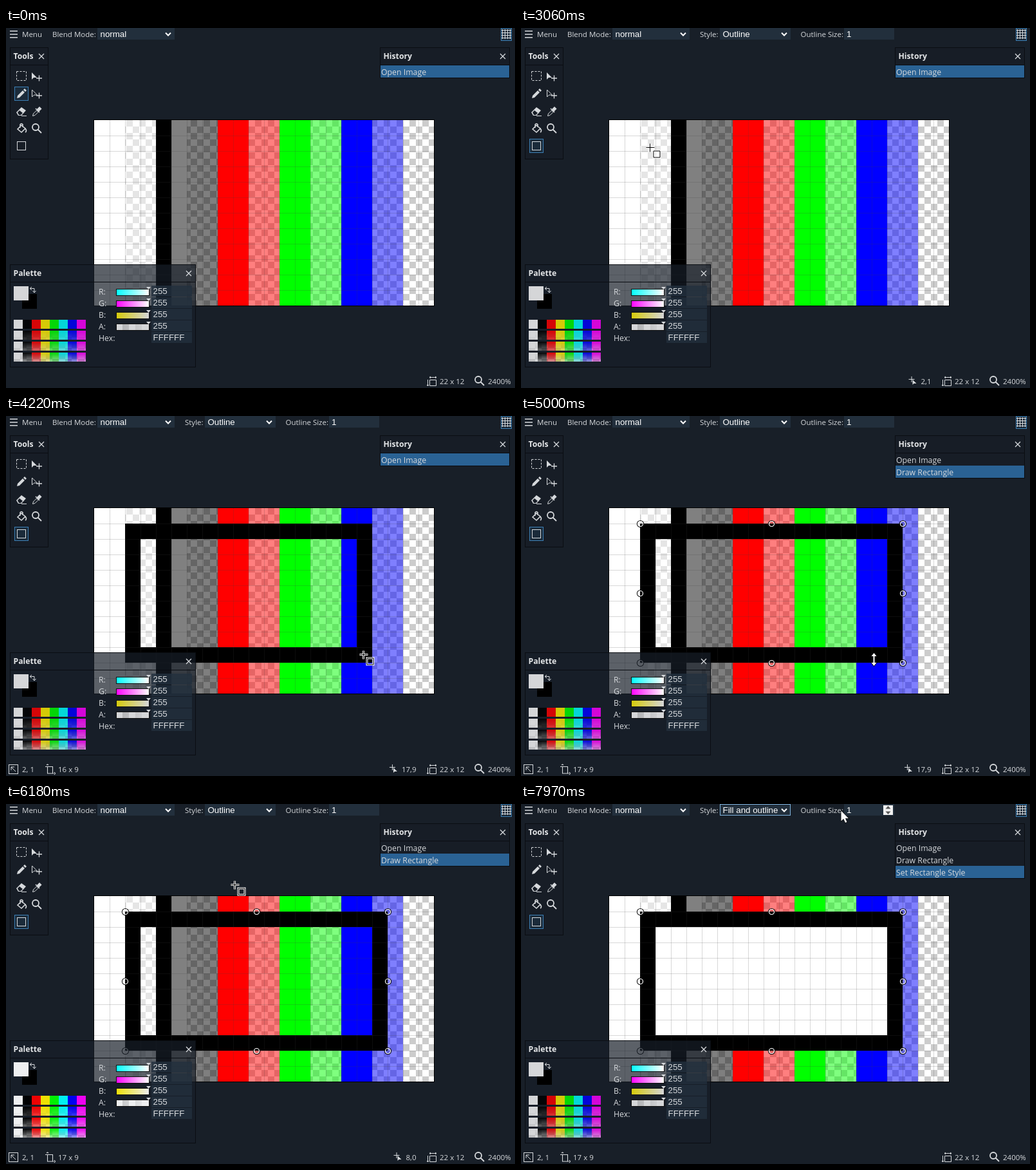
Recreate the animation shown at these times as an HTML page with a canvas. Size 791 by 559 pixels, loop 8000 ms.

```html
<!DOCTYPE html>
<html lang="en">
<head>
<meta charset="utf-8">
<title>Pixel editor: rectangle tool</title>
<style>
  html, body { margin: 0; width: 100%; height: 100%; overflow: hidden; background: #181f28; }
  canvas { display: block; }
</style>
</head>
<body>
<canvas id="stage" width="791" height="559"></canvas>
<script>
const ctx = document.getElementById('stage').getContext('2d');
const LOOP = 8000, CELL = 24, LEFT = 137, TOP = 143;
const INK = '#d6d9dc', FIELD = '#222f3c', BLUE = '#2a6294';
const UI = '11.5px "Open Sans", sans-serif';
const UI_BIG = '12.3px "Open Sans", sans-serif';
const TITLE = 'bold 12.2px "Open Sans", sans-serif';
const FORM = '13.333px "Liberation Sans", Arial, sans-serif';

// Pointer bursts: start, end, number of steps, evenly spaced waypoints.
const bursts = [
  [670, 1090, 7, [[4, 330], [60, 240], [30, 179]]],
  [1380, 1380, 1, [[29, 178]]],
  [2270, 3060, 9, [[29, 178], [29, 178], [120, 180], [200, 185]]],
  [3140, 3830, 8, [[200, 185], [486, 347]]],
  [3950, 4020, 2, [[515, 365], [545, 368]]],
  [4220, 4320, 2, [[555, 370], [590, 372]]],
  [4690, 5480, 9, [[590, 372], [478, 388]]],
  [5570, 6330, 9, [[470, 395], [270, 420], [310, 250], [355, 125], [372, 36]]],
  [6430, 7220, 9, [[370, 24], [378, 8], [380, 12], [384, 61]]],
  [7780, 7970, 3, [[430, 50], [497, 10]]]
];

function along(points, u) {
  const p = Math.max(0, u) * (points.length - 1);
  const i = Math.min(Math.floor(p), Math.max(0, points.length - 2));
  const a = points[i], b = points[i + 1] || a;
  return [0, 1].map(k => a[k] + (b[k] - a[k]) * (p - i));
}

const clamp = (v, lo, hi) => Math.max(lo, Math.min(hi, v));

function pointerAt(t) {
  const burst = bursts.filter(b => t >= b[0]).pop();
  if (!burst) return null;
  const [start, end, steps, points] = burst;
  const last = Math.max(1, steps - 1);
  const step = end > start ? Math.floor(Math.min(1, (t - start) / (end - start)) * last + 1e-6) : 0;
  const [x, y] = along(points, step / last);
  const [lagX, lagY] = along(points, (step - 0.5) / last);
  const overPanel = (x > 6 && x < 66 && y > 30 && y < 204) || (x > 6 && x < 295 && y > 367 && y < 527);
  let kind = overPanel || y < 40 || t >= 6330 ? 'arrow' : 'cross';
  if (kind === 'cross' && t >= 4690 && Math.abs(y - 383) < 8) kind = 'resize';
  return {
    x, y, kind,
    col: clamp(Math.floor((lagX - LEFT) / CELL), 0, 21),
    row: clamp(Math.floor((lagY - TOP) / CELL), 0, 11)
  };
}

function box(x, y, w, h, fill, stroke) {
  if (fill) { ctx.fillStyle = fill; ctx.fillRect(x, y, w, h); }
  if (stroke) {
    ctx.strokeStyle = stroke; ctx.lineWidth = 1;
    ctx.strokeRect(x + 0.5, y + 0.5, w - 1, h - 1);
  }
}

function text(str, x, y, font = UI, color = INK) {
  ctx.font = font; ctx.fillStyle = color;
  ctx.fillText(str, x, y);
}

function path(d, x = 0, y = 0, fill = null, stroke = INK, width = 1) {
  const p = new Path2D(d);
  ctx.save();
  ctx.translate(x, y);
  if (stroke) { ctx.strokeStyle = stroke; ctx.lineWidth = width; ctx.stroke(p); }
  if (fill) { ctx.fillStyle = fill; ctx.fill(p); }
  ctx.restore();
}

const tile = document.createElement('canvas');
tile.width = tile.height = 20;
const tileCtx = tile.getContext('2d');
tileCtx.fillStyle = '#ccc'; tileCtx.fillRect(0, 0, 20, 20);
tileCtx.fillStyle = '#fff'; tileCtx.fillRect(0, 0, 10, 10); tileCtx.fillRect(10, 10, 10, 10);
const checks = ctx.createPattern(tile, 'repeat');

function checker(x, y, w, h) {
  ctx.save();
  ctx.translate(x, y);
  box(0, 0, w, h, checks);
  ctx.restore();
}

function image(t, rect) {
  const w = 22 * CELL, h = 12 * CELL;
  box(LEFT - 1, TOP - 1, w + 2, h + 2, '#000');
  checker(LEFT, TOP, w, h);
  const bands = [
    [0, 2, '#fff'], [2, 2, '#ffffff80'], [4, 1, '#000'], [5, 1, '#808080'], [6, 2, '#00000080'],
    [8, 2, '#f00'], [10, 2, '#ff000080'], [12, 2, '#0f0'], [14, 2, '#00ff0080'],
    [16, 2, '#00f'], [18, 2, '#0000ff80']
  ];
  for (const [col, n, color] of bands) box(LEFT + col * CELL, TOP, n * CELL, h, color);
  const x = LEFT + 2 * CELL, y = TOP + CELL;
  if (rect) {
    const rw = rect.w * CELL, rh = rect.h * CELL;
    if (t >= 7590) box(x, y, rw, rh, '#fff');
    ctx.fillStyle = '#000';
    ctx.beginPath();
    ctx.rect(x, y, rw, rh);
    if (rect.w > 2 && rect.h > 2) ctx.rect(x + CELL, y + CELL, rw - 2 * CELL, rh - 2 * CELL);
    ctx.fill('evenodd');
  }
  const line = 'rgba(60,60,60,.2)';
  for (let i = 1; i < 22; i++) box(LEFT + i * CELL, TOP, 1, h, line);
  for (let i = 1; i < 12; i++) box(LEFT, TOP + i * CELL, w, 1, line);
  if (t >= 4690) {
    for (const i of [0, 1, 2]) for (const j of [0, 1, 2]) {
      if (i === 1 && j === 1) continue;
      for (const [r, color] of [[5, '#000'], [4, '#fff']]) {
        ctx.beginPath();
        ctx.arc(x + i * 204 + 0.5, y + j * 108 + 0.5, r, 0, 7);
        ctx.strokeStyle = color; ctx.lineWidth = 1.2; ctx.stroke();
      }
    }
  }
}

function panel(x, y, w, h, title, closeX, fill = '#171d26') {
  box(x, y, w, h, fill, '#0a0d12');
  box(x + 1, y + 27, w - 2, 1, '#0a0d12');
  text(title, x + 5.5, y + 18, TITLE, '#e4e6e8');
  path('M-4-4 4 4M4-4-4 4', closeX, y + 14, null, INK, 1.3);
}

function tools(t) {
  panel(6, 30, 60, 174, 'Tools', 55);
  box(13, t < 2270 ? 91 : 172, 22, 22, '#1b2b3a', '#3b7fb5');
  ctx.setLineDash([3, 2]);
  path('M16.5 67.5h15v14h-15z');
  ctx.setLineDash([]);
  const pointer = 'M0 0V11L3 8H8z', move = 'M7 9h9M11.500 4.500v9';
  path(pointer, 40, 69, INK, null);
  path(move, 40, 69, null, INK, 1.3);
  path(pointer, 40.5, 96);
  path(move, 40, 96, null, INK, 1.3);
  path('M17 109l1-4 8-8 3 3-8 8zM27 96l2-2 3 3-2 2z', 0, 0, INK, null);
  path('M16 131l8-8 7 5-7 8h-5z', 0, 0, INK, null);
  path('M18 131l3-3 5 4-3 3h-3z', 0, 0, '#171d26', null);
  path('M24 136.500h8');
  path('M41.500 136.500l1-3.500 5-5 2.500 2.500-5 5z');
  path('M46 125l6 6M49 126l3-3 2.500 2.500-3 3z', 0, 0, INK, INK, 1.5);
  path('M18 157l6-6 6 5-6 6zM22 155v-5q2-3 4 0v4M30 156q3 4 0 6', 0, 0, null, INK, 1.6);
  magnifier(46, 154);
  box(17, 176, 14, 14, null, INK);
}

function magnifier(x, y) {
  path('M5 0A5 5 0 1 1-5 0 5 5 0 1 1 5 0M3.500 3.500 9 9', x, y, null, INK, 1.8);
}

function history(t) {
  const rows = ['Open Image', 'Draw Rectangle', 'Set Rectangle Style'];
  const count = 1 + (t >= 4690) + (t >= 7590);
  panel(581, 30, 202, 29 + 19 * count, 'History', 772);
  for (let i = 0; i < count; i++) {
    if (i === count - 1) box(582, 58 + 19 * i, 200, 19, BLUE);
    text(rows[i], 583, 73 + 19 * i, UI_BIG);
  }
}

function palette(t) {
  panel(6, 367, 289, 160, 'Palette', 284, 'rgba(24,31,41,.7)');
  const shade = `rgba(24,31,41,${t > 5700 && t < 6230 ? 0.07 : 0.18})`;
  const gradient = (x0, y0, x1, y1, from, to) => {
    const g = ctx.createLinearGradient(x0, y0, x1, y1);
    g.addColorStop(0, from); g.addColorStop(1, to);
    return g;
  };
  box(25, 413, 23, 23, '#000');
  box(12, 401, 23, 22, '#fff');
  box(12, 401, 23, 22, shade);
  const hues = ['255,255,255', '0,0,0', '255,0,0', '255,240,0', '0,255,0', '0,255,255', '0,0,255', '255,0,255'];
  for (let r = 0; r < 4; r++) {
    const y = 453 + 17 * r;
    checker(12, y, 112, 14);
    hues.forEach((rgb, i) => box(12 + 14 * i, y, 14, 14,
      gradient(0, y, 0, y + 14, `rgba(${rgb},1)`, `rgba(${rgb},${1 - r * 0.22})`)));
    box(12, y, 112, 14, shade);
  }
  path('M38 404.500h6v6M40 402l-3 2.500 3 2.500M41.500 408l2.500 3 2.500-3');
  const sliders = [['R:', '0,255,255'], ['G:', '255,0,255'], ['B:', '255,240,0'], ['A:', '255,255,255']];
  sliders.forEach(([label, rgb], i) => {
    const y = 405 + 18 * i;
    text(label, 144, y + 9, UI_BIG);
    if (i === 3) checker(171, y, 52, 11);
    box(171, y, 52, 11, gradient(171, 0, 222, 0, `rgba(${rgb},${i === 3 ? 0 : 1})`, '#fff'));
    if (i > 1) box(171, y, 52, 11, shade);
    box(171, y, 52, 11, null, '#111');
    path('M218 0h7l-3.500 4z', 0, y - 3, INK, null);
    box(226, y - 5, 63, 17, 'rgba(34,48,62,.8)');
    text('255', 228.5, y + 8, FORM);
  });
  text('Hex:', 144, 486, UI_BIG);
  box(226, 472, 63, 17, 'rgba(34,48,62,.8)');
  text('FFFFFF', 228.5, 485, FORM);
}

function select(x, w, value, focus) {
  box(x, 0, w, 18, FIELD, focus ? '#7fb2dc' : null);
  text(value, x + 4.5, 14, FORM, '#fff');
  path('M-4-2 0 2 4-2', x + w - 10, 9.5, null, '#fff', 2);
}

function toolbar(t, pointer) {
  for (const y of [4, 9, 14]) box(6, y, 12, 1.5, INK);
  text('Menu', 25, 14);
  text('Blend Mode:', 72, 14);
  select(142, 120, 'normal');
  box(769, 0, 17, 20, '#1b2b3a', '#3b7fb5');
  for (let i = 0; i < 4; i++) {
    box(771 + 4 * i, 2, 1, 15, INK);
    box(770, 3 + 4 * i, 15, 1, INK);
  }
  if (t < 2270) return;
  text('Style:', 278, 14);
  select(309, 110, t < 7590 ? 'Outline' : 'Fill and outline', t >= 6600);
  text('Outline Size:', 434.5, 14);
  box(502, 0, 78, 18, FIELD);
  text('1', 506, 14, FORM, '#fff');
  if (t >= 7780 && pointer.x > 480) {
    box(563, 2, 15, 15, '#f0f0f0');
    path('M570.500 3l4 4.500h-8zM570.500 16l4-4.500h-8z', 0, 0, '#555', null);
  }
  if (t >= 6800 && t < 7590) {
    box(309, 18, 110, 52, FIELD, '#7fb2dc');
    const active = clamp(Math.floor((pointer.y - 18) / 17), 0, 2);
    box(310, 18 + 17 * active, 108, 17, '#1e90ff');
    ['Outline', 'Fill', 'Fill and outline'].forEach((s, i) => text(s, 314, 31 + 16.7 * i, FORM, '#fff'));
  }
}

function sizeIcon(x) {
  path('M3.500 3v11h10M0 3.500h11.500v10M2 1l1.500-1 1.500 1M14 12l1.500 2-1.500 2', x, 541, null, INK, 1.1);
}

function canvasIcon(x) {
  path('M4.500 5.500h10v9h-10zM4 1.500h11M1.500 5v10M6 0l-2 1.500 2 1.500M13 0l2 1.500-2 1.500M0 13l1.500 2 1.500-2', x, 541);
}

function statusBar(t, pointer, rect) {
  if (rect) {
    box(4, 541, 15, 15, null, INK);
    path('M8 545l7 7M8 550v-5h5');
    text('2, 1', 25, 553);
    sizeIcon(61);
    text(`${rect.w} x ${rect.h}`, 81, 553);
  }
  if (pointer && pointer.kind !== 'arrow') {
    const label = `${pointer.col},${pointer.row}`;
    ctx.font = UI;
    const x = 637.5 - ctx.measureText(label).width;
    path('M0 4.500h9M4.500 0v9', x - 19, 541);
    path('M0 0v8l2-2h4z', x - 13, 546, INK, null);
    text(label, x, 553);
  }
  canvasIcon(654);
  text('22 x 12', 674, 553);
  magnifier(734, 546);
  text('2400%', 749, 553);
}

function drawPointer({ x, y, kind }, square) {
  if (kind === 'arrow') {
    path('M.5.5V16.500L4.200 13 7 19l2.500-1L7 12.300H12z', x, y, '#fff', '#000', 1.2);
  } else if (kind === 'resize') {
    path('M0-10 4-5H1V5H4L0 10-4 5H-1V-5H-4z', x + 0.5, y, '#fff', '#000', 1.6);
  } else {
    const shape = 'M-6 0H7M0-6V7' + (square ? 'M5.500 5.500h10v10h-10z' : '');
    const px = Math.round(x) + 0.5, py = Math.round(y) + 0.5;
    path(shape, px, py, null, '#fff', 3);
    path(shape, px, py, null, '#000', 1);
  }
}

function render(t) {
  const pointer = pointerAt(t);
  let rect = null;
  if (t >= 4690) rect = { w: 17, h: 9 };
  else if (t >= 3140) rect = { w: Math.max(1, pointer.col - 1), h: Math.max(1, pointer.row) };
  box(0, 0, 791, 559, '#181f28');
  image(t, rect);
  tools(t);
  history(t);
  palette(t);
  toolbar(t, pointer);
  statusBar(t, pointer, rect);
  if (t >= 1880 && t < 2270) {
    box(39, 192, 88, 25, '#1f2730', '#d0d3d6');
    text('Rectangle (O)', 47, 209);
  }
  if (pointer) drawPointer(pointer, t >= 2270);
}

const begin = performance.now();
function tick() {
  render((performance.now() - begin) % LOOP);
  requestAnimationFrame(tick);
}
tick();
</script>
</body>
</html>
```
